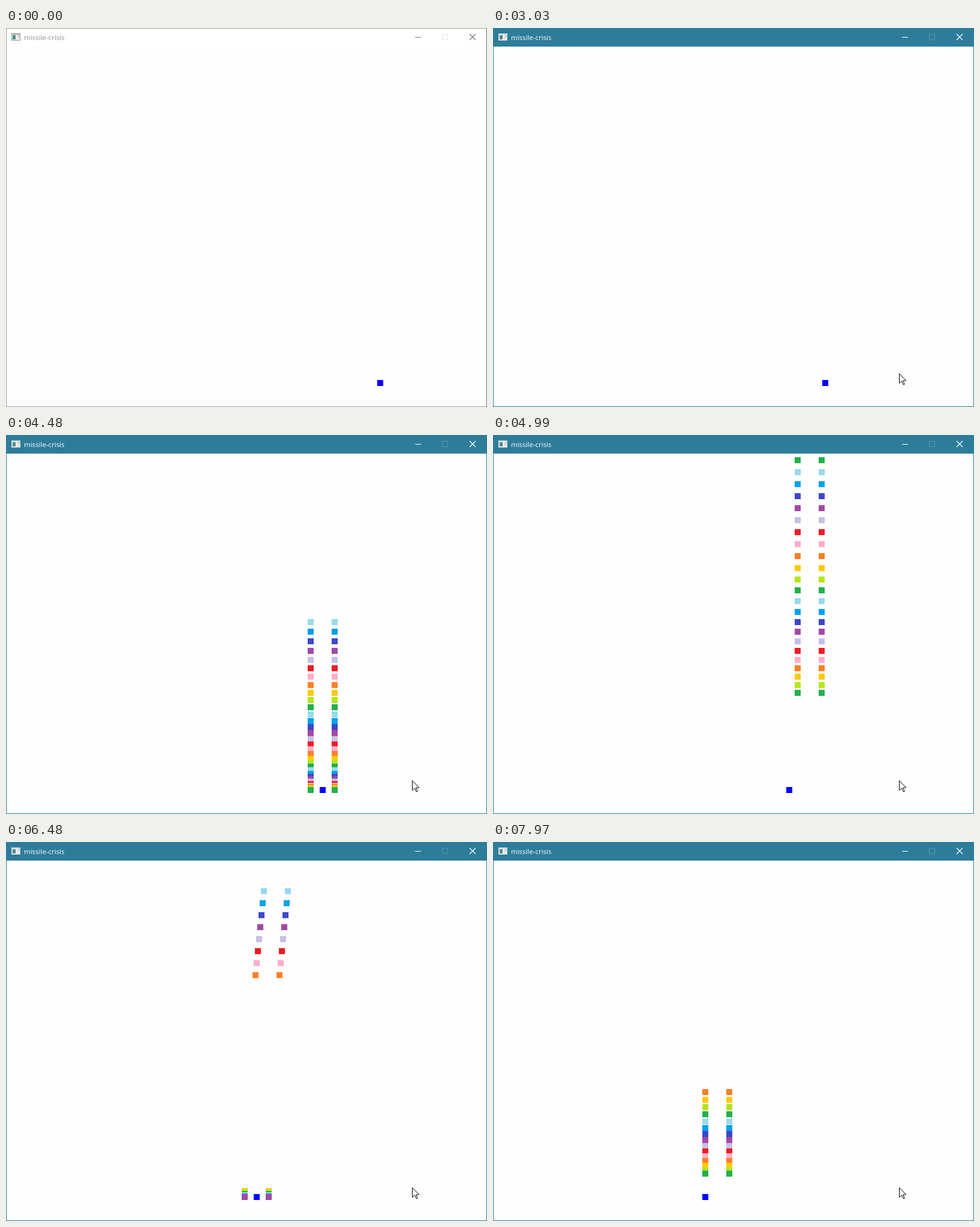
Write an HTML page with a canvas that moves like this. It is 802x632 px and loops after 7990 ms.

```html
<!DOCTYPE html>
<html lang="en">
<head>
<meta charset="utf-8">
<title>missile-crisis</title>
<style>
  html, body { margin: 0; width: 100%; height: 100%; overflow: hidden; background: #fefefe; }
  canvas { display: block; }
</style>
</head>
<body>
<canvas id="stage" width="802" height="632"></canvas>
<script>
const ctx = document.getElementById('stage').getContext('2d');
const W = 802, H = 632, LOOP = 7990;
const SIZE = 10, GROUND = 587, GAP = 20, TOP_SPEED_AT = 40, LIFE = 47;
const FOCUS_AT = 1460, FADE = 260;

const PALETTE = ['#99d9ea', '#00a2e8', '#3f48cc', '#a349a4', '#c8bfe7', '#ed1c24',
                 '#ffaec9', '#ff7f27', '#ffc90e', '#b5e61d', '#22b14c'];

// The game runs at about 50 ticks a second, a little unevenly
const CLOCK = [
  { ms: 2340, tick: -60 }, { ms: 3030, tick: -25 }, { ms: 3520, tick: -12 },
  { ms: 3840, tick: 0 }, { ms: 4480, tick: 33 }, { ms: 5500, tick: 82 },
  { ms: 6480, tick: 124 }, { ms: 7170, tick: 160 }, { ms: 7970, tick: 201 }
];

// Keys held down, in ticks
const LEFT = [{ from: -60, to: -12 }, { from: 40, to: 95 }, { from: 145, to: 167 }, { from: 191, to: 201 }];
const FIRE = [{ from: 0, to: 33 }, { from: 79, to: 87 }, { from: 118, to: 139 }, { from: 175, to: 190 }];

const clamp = (v, lo, hi) => Math.min(hi, Math.max(lo, v));

function tickAt(ms) {
  const next = clamp(CLOCK.findIndex(key => key.ms > ms), -1, CLOCK.length);
  const b = CLOCK[next < 0 ? CLOCK.length - 1 : Math.max(1, next)];
  const a = CLOCK[CLOCK.indexOf(b) - 1];
  const p = clamp((ms - a.ms) / (b.ms - a.ms), 0, 1);
  return Math.floor(a.tick + (b.tick - a.tick) * p + 0.02);
}

function playerX(tick) {
  return LEFT.reduce((x, { from, to }) => x - 2 * (clamp(tick, from, to) - from), 619);
}

// Gains 2 px of speed every 4 ticks, then flies at 20 px per tick
function climb(age) {
  const n = Math.max(0, age - 1), m = Math.min(n, TOP_SPEED_AT);
  const k = m >> 2, r = m & 3;
  return 4 * k * k + 3 * k + (r ? r * (2 * k + 2) - 1 : 0) + 20 * (n - m);
}

function rect(x, y, w, h, color) {
  ctx.fillStyle = color;
  ctx.fillRect(x, y, w, h);
}

function line(points, color, width = 1) {
  ctx.beginPath();
  points.forEach(([x, y]) => ctx.lineTo(x, y));
  ctx.strokeStyle = color;
  ctx.lineWidth = width;
  ctx.stroke();
}

function drawWindow(focus) {
  const shade = (off, on) =>
    `rgb(${on.map((v, i) => Math.round(off + (v - off) * focus)).join()})`;
  const teal = [45, 125, 154], white = [255, 255, 255];

  rect(0, 0, W, H, '#fefefe');
  rect(0, 0, W, 31, shade(255, teal));

  const edge = shade(158, teal);
  rect(0, 0, W, 1, edge);
  rect(0, 0, 1, H, edge);
  rect(0, H - 1, W, 1, edge);
  rect(W - 1, 0, 1, H, shade(110, teal));

  // Program icon
  rect(9, 9, 15, 12, shade(150, [205, 212, 215]));
  rect(10, 11, 13, 9, '#f2f2f2');
  rect(11, 12, 5, 7, '#4f8a8b');
  rect(18, 12, 3, 7, '#e2e4e5');
  rect(21, 12, 1, 3, '#8295a0');

  ctx.font = '11.5px "Open Sans", "Noto Sans", sans-serif';
  ctx.fillStyle = shade(145, white);
  ctx.fillText('missile-crisis', 30, 20);

  const ink = shade(122, white);
  rect(682, 15, 10, 1, ink);
  ctx.strokeStyle = shade(228, [87, 151, 174]);
  ctx.lineWidth = 1;
  ctx.strokeRect(727.5, 10.5, 9, 9);
  line([[773, 10], [783, 20]], ink, 1.3);
  line([[783, 10], [773, 20]], ink, 1.3);
}

function drawMissiles(tick) {
  let shot = 0;
  for (const { from, to } of FIRE) {
    for (let born = from; born < to; born++, shot++) {
      const age = tick - born;
      if (age < 0 || age > LIFE) continue;
      const x = playerX(born), y = GROUND - climb(age);
      const color = PALETTE[shot % PALETTE.length];
      rect(x - GAP, y, SIZE, SIZE, color);
      rect(x + GAP, y, SIZE, SIZE, color);
    }
  }
}

function drawCursor(x, y) {
  const arrow = new Path2D('M0 0V16L4 12.4L6.5 18H8.5V17L6.3 11.5H11.3Z');
  ctx.save();
  ctx.translate(x + 0.5, y + 0.5);
  ctx.fillStyle = '#fff';
  ctx.fill(arrow);
  ctx.strokeStyle = '#000';
  ctx.lineWidth = 1;
  ctx.stroke(arrow);
  ctx.restore();
}

function draw(ms) {
  const tick = tickAt(ms);
  drawWindow(clamp((ms - FOCUS_AT) / FADE, 0, 1));
  drawMissiles(tick);
  rect(playerX(tick), GROUND, SIZE, SIZE, '#0000ff');
  if (ms >= FOCUS_AT) drawCursor(677, 576);
}

const began = performance.now();
function frame() {
  draw((performance.now() - began) % LOOP);
  requestAnimationFrame(frame);
}
frame();
</script>
</body>
</html>
```
